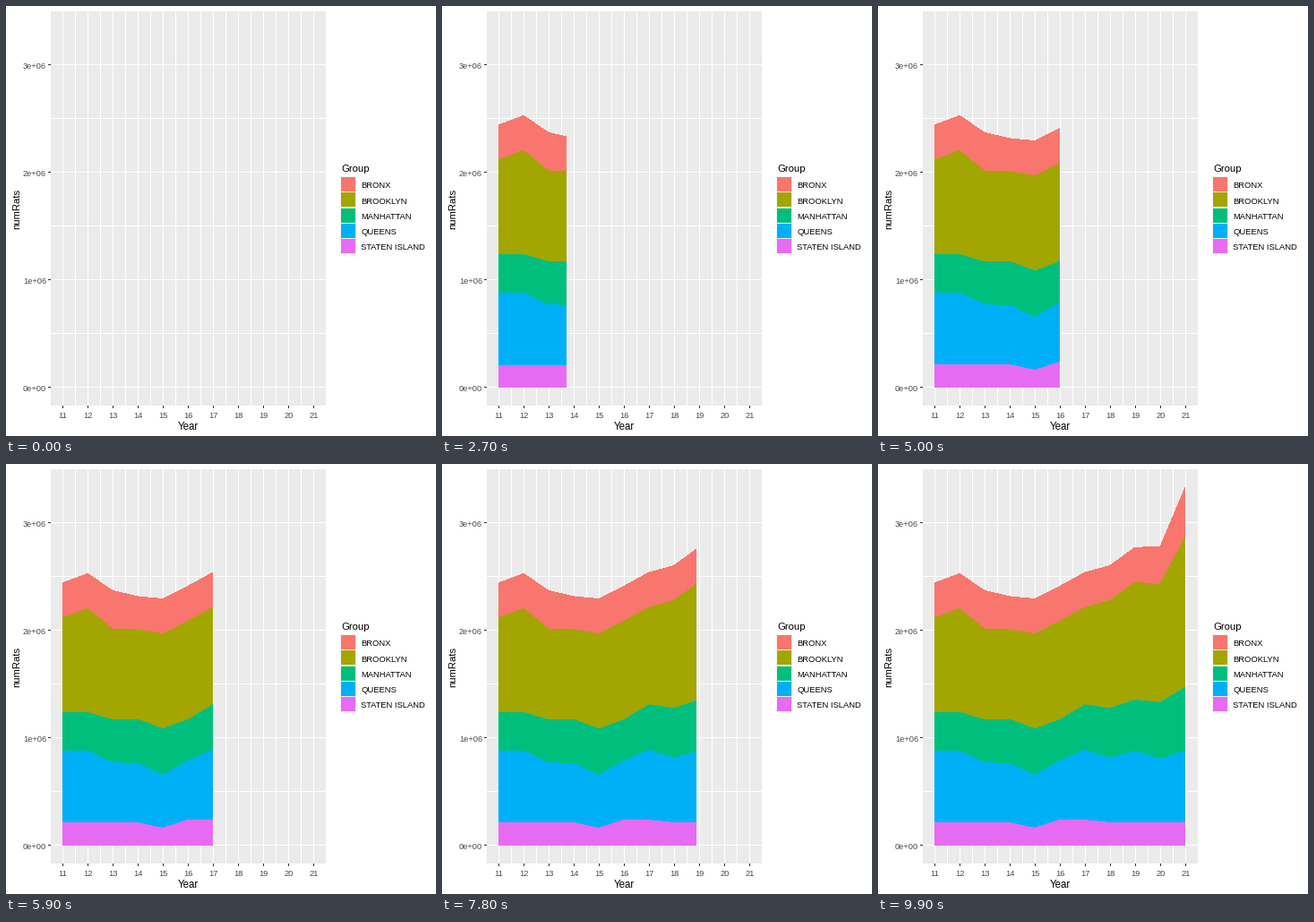
These frames come from a looping animation (480 by 480 pixels, 10 s). A matplotlib script:

```python
import matplotlib.pyplot as plt
import numpy as np
from matplotlib.animation import FuncAnimation
from matplotlib.patches import Polygon, Rectangle

SIZE, DPI = 480, 72
FRAMES, INTERVAL = 100, 100
LEFT, TOP, WIDTH, HEIGHT = 50, 6, 307, 440
BASE, MILLION = 426, 120.17

plt.rcParams["font.family"] = "Liberation Sans"

YEARS = np.arange(11, 22)
T = YEARS - YEARS[0]
X = 63 + 28 * T
# Each year is reached on a whole frame; the reveal is linear in between.
REACHED = np.round(np.linspace(0, FRAMES - 1, len(YEARS)))


def bump(year, height, width=1):
    """A triangular rise or dip around one year."""
    return height * np.clip(1 - abs(YEARS - year) / width, 0, None)


# Name, colour and height in pixels of each band, top band first.
BANDS = [
    ("BRONX", "#F8766D",
     39 + bump(13, 4) + bump(14, -2) + bump(20, 3) + bump(21, 17)),
    ("BROOKLYN", "#A3A500",
     99.5 + 0.42 * T**2 + bump(11, 6) + bump(12, 16) + bump(14, -3)
     + bump(17, -6) + bump(19, 5) + bump(20, -2) + bump(21, 26)),
    ("MANHATTAN", "#00BF7D",
     43 + 0.28 * T**2 + 4 * np.sin(np.pi * T / 5)
     + bump(12, -2.5) + bump(15, 2) + bump(16, -4) + bump(18, 3)),
    ("QUEENS", "#00B0F6",
     80 + bump(15, -21, 3) + bump(13, -6) + bump(17, 5)
     + bump(18, -8) + bump(20, -9)),
    ("STATEN ISLAND", "#E76BF3",
     25.4 + bump(15, -6) + bump(16.5, 4.5, 1.5)),
]

fig = plt.figure(figsize=(SIZE / DPI, SIZE / DPI), dpi=DPI, facecolor="white")
ax = fig.add_axes([0, 0, 1, 1])
ax.set_xlim(0, SIZE)
ax.set_ylim(SIZE, 0)
ax.axis("off")


def box(x, y, w, h, color):
    ax.add_patch(Rectangle((x, y), w, h, fc=color, lw=0, antialiased=False))


def label(x, y, s, size=9.3, color="black", **kw):
    ax.text(x, y, s, fontsize=size, color=color, va="baseline", **kw)


def draw_panel():
    box(LEFT, TOP, WIDTH, HEIGHT, "#EBEBEB")
    # Grid lines every half step, ticks and labels on whole steps.
    for half in range(7):
        y = int(BASE - 0.1 - MILLION * half / 2)
        box(LEFT, y, WIDTH, 1, "white")
        if half % 2 == 0:
            box(LEFT - 3, y, 3, 1, "#333333")
            text = f"{half // 2}e+06" if half else "0e+00"
            label(45, y + 5, text, color="#4D4D4D", ha="right")
    for x, year in zip(X, YEARS):
        box(x, TOP, 1, HEIGHT, "white")
        if year < YEARS[-1]:
            box(x + 14, TOP, 1, HEIGHT, "white")
        box(x, TOP + HEIGHT, 1, 3, "#333333")
        label(x + 0.5, 460, str(year), color="#4D4D4D", ha="center")
    label(203, 473, "Year", 11.5, ha="center")
    label(15.5, 226, "numRats", 11.3, ha="center",
          rotation=90, rotation_mode="anchor")


def draw_legend():
    label(374, 185, "Group", 11.3)
    box(373, 190, 18, 87, "#F2F2F2")
    for i, (name, color, _) in enumerate(BANDS):
        offset = 17.28 * i
        box(374, round(191.2 + offset), 16, 16, color)
        label(396.5, 203.3 + offset, name, 9.4)


draw_panel()
draw_legend()

heights = np.array([h for _, _, h in BANDS])
floor = np.full((1, len(YEARS)), BASE)
edges = np.vstack([BASE - heights[::-1].cumsum(axis=0)[::-1], floor])
areas = [
    ax.add_patch(Polygon([[X[0], BASE]] * 3, fc=color, lw=0,
                         antialiased=False, zorder=2))
    for _, color, _ in BANDS
]


def update(frame):
    done = REACHED < frame

    def reveal(values):
        return np.append(values[done], np.interp(frame, REACHED, values))

    xs = np.round(reveal(X))
    lines = [reveal(e) for e in edges]
    for area, upper, lower in zip(areas, lines, lines[1:]):
        area.set_visible(frame > 0)
        area.set_xy(np.column_stack([np.append(xs, xs[::-1]),
                                     np.append(upper, lower[::-1])]))
    return areas


anim = FuncAnimation(fig, update, frames=FRAMES, interval=INTERVAL,
                     repeat=True, repeat_delay=0)
plt.show()
```
